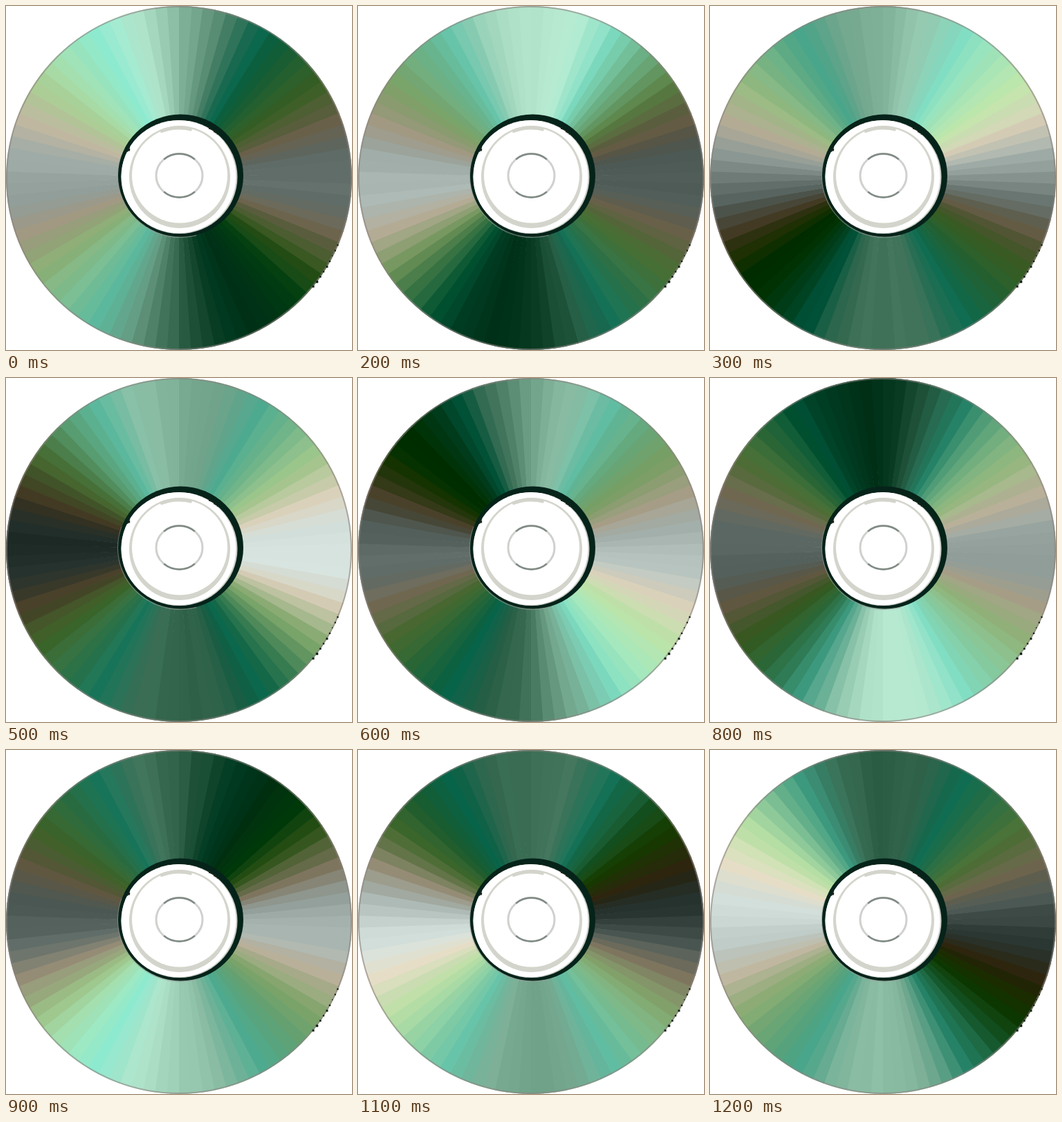
Write an HTML page with a canvas that moves like this. It is 500 px wide and 497 px high and loops after 1300 ms.

```html
<!DOCTYPE html>
<html lang="en">
<head>
<meta charset="utf-8">
<title>Spinning disc</title>
<style>
html, body { margin: 0; width: 100%; height: 100%; overflow: hidden; background: #fff; }
canvas { display: block; width: 500px; height: 497px; }
</style>
</head>
<body>
<canvas width="500" height="497"></canvas>
<script>
const ctx = document.querySelector('canvas').getContext('2d');
const RAD = Math.PI / 180, CX = 250, CY = 248, WEDGE = 4, TURN = 40, LOOP = 1300;

// Fixed tints from the vertical axis to the horizontal one: pale, teal, olive, pink, grey
const TINTS = [
  [0, [105, 155, 130]], [16, [105, 157, 132]], [30, [64, 157, 130]],
  [56, [114, 152, 92]], [70, [153, 144, 122]], [80, [138, 150, 145]], [90, [138, 150, 145]]
];
// Peaks and valleys of brightness, clockwise from the main highlight
const LIGHT = [[0, 78], [62, -60], [125, -40], [178, -108], [245, 34], [280, 8], [360, 78]];

const mix = (a, b, t) => a + (b - a) * t;
const smooth = t => (1 - Math.cos(Math.PI * t)) / 2;
const noise = n => { const s = Math.sin(n * 12.9898) * 43758.5453; return s - Math.floor(s) - 0.5; };

function between(stops, x) {
  const i = stops.findIndex((stop, k) => k && x <= stop[0]);
  const [x0, a] = stops[i - 1], [x1, b] = stops[i];
  return { a, b, t: (x - x0) / (x1 - x0) };
}

function wedgeColor(angle, turn) {
  const half = angle % 180, rel = (angle - turn + 360) % 360;
  const tint = between(TINTS, Math.min(half, 180 - half));
  const { a, b, t } = between(LIGHT, rel);
  const light = mix(a, b, smooth(t)) + 6 * noise(rel);
  return `rgb(${tint.a.map((c, k) =>
    Math.max(0, Math.min(255, Math.round(mix(c, tint.b[k], tint.t) + light))))})`;
}

function oval(x, y, rx, ry, from = 0, to = 360) {
  ctx.beginPath();
  ctx.ellipse(x, y, rx, ry, 0, from * RAD, to * RAD);
}
function fill(color) { ctx.fillStyle = color; ctx.fill(); }
function stroke(color, width) { ctx.strokeStyle = color; ctx.lineWidth = width; ctx.stroke(); }

function drawSurface(turn) {
  ctx.save();
  oval(CX, 248.5, 250, 248.5);
  ctx.clip();
  // One wedge past the full circle hides the seam; each overlaps the next a little
  for (let a = 0; a <= 360; a += WEDGE) {
    ctx.beginPath();
    ctx.moveTo(CX, CY);
    ctx.arc(CX, CY, 260, (a - 90) * RAD, (a + WEDGE - 89.7) * RAD);
    fill(wedgeColor(a + WEDGE / 2, turn));
  }
  ctx.restore();
  oval(CX, 248.5, 249, 247.5);
  stroke('rgba(140,130,127,.6)', 2);
}

function drawHub() {
  oval(252, 245.5, 90, 88.5, 75, 200);
  stroke('rgba(150,155,148,.6)', 2);
  oval(252.5, 245, 90.5, 88.5);
  fill('#06231a');
  oval(250.5, 247, 84, 82);
  fill('#c9ccc5');
  oval(249.5, 246.5, 83, 81.5);
  fill('#fff');

  // Raised ring, thicker towards the bottom
  oval(251, 247, 73, 74);
  fill('#d3d4cb');
  oval(251, 244.5, 69, 69);
  fill('#fff');
  oval(250, 248, 72, 72, 248, 285);
  stroke('#d3d4cb', 5);

  oval(250.5, 245, 33.5, 31.5);
  stroke('#cfd1ce', 3);
  for (const mid of [90, 270]) {
    oval(250.5, 245, 33.5, 31.5, mid - 42, mid + 42);
    stroke('#7f8a83', 2.5);
  }
}

// Rough dark specks along an arc
function drawSpecks(x, y, radius, from, to) {
  ctx.fillStyle = '#13221a';
  for (let a = from; a <= to; a += 2) {
    const size = 2.5 + 2 * noise(a);
    ctx.fillRect(x + radius * Math.cos(a * RAD) - 1, y + radius * Math.sin(a * RAD) - 1, size, size);
  }
}

let shown = -1;
function render() {
  // Poses hold 200 ms and 100 ms in turn
  const time = performance.now() % LOOP;
  const step = 2 * Math.floor(time / 300) + (time % 300 >= 200 ? 1 : 0);
  if (step !== shown) {
    shown = step;
    ctx.clearRect(0, 0, 500, 497);
    drawSurface(step * TURN - 25);
    drawHub();
    drawSpecks(CX, CY, 249, 23, 40);
    drawSpecks(CX, 246, 83, 300, 312);
    drawSpecks(CX, 246, 83, 206, 210);
  }
  requestAnimationFrame(render);
}
render();
</script>
</body>
</html>
```
